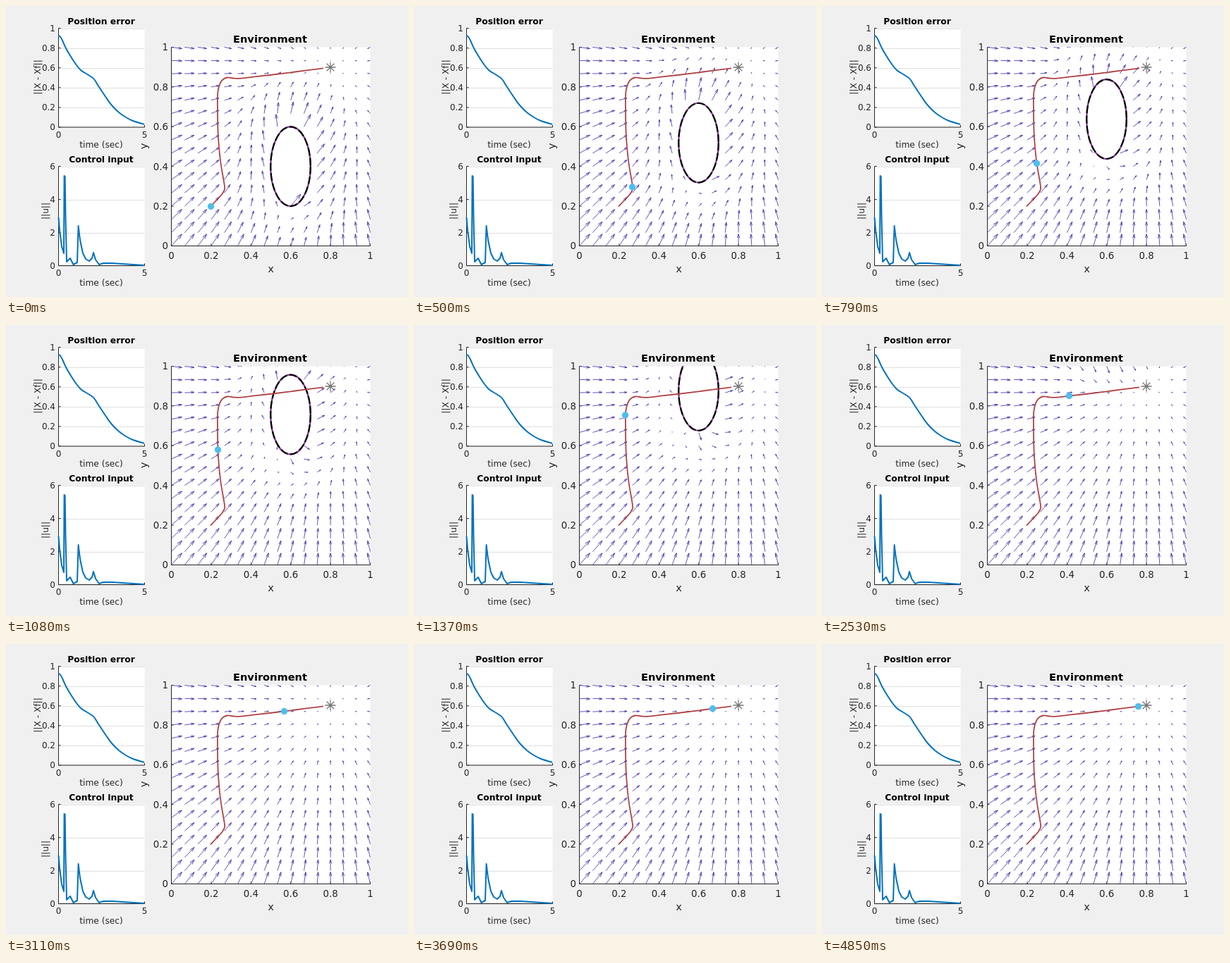
Write an HTML page that moves like this. It is 570 px wide and 413 px high and loops after 5.14 s.

```html
<!DOCTYPE html>
<html lang="en">
<head>
<meta charset="utf-8">
<title>Vector field navigation</title>
<style>
  html, body { margin: 0; width: 100%; height: 100%; overflow: hidden; background: #f0f0f0; }
  svg { display: block; }
  text { font-family: "DejaVu Sans", sans-serif; fill: #262626; }
  .title { font-weight: bold; fill: #000; }
  .grid { stroke: #dfdfdf; }
  .axis { stroke: #262626; fill: none; }
  .curve { stroke: #0072bd; stroke-width: 2; fill: none; stroke-linejoin: round; }
</style>
</head>
<body>
<svg id="stage" width="570" height="413" viewBox="0 0 570 413">
  <clipPath id="field"><rect x="234" y="58" width="283" height="283"/></clipPath>
  <g id="plots"></g>
  <g clip-path="url(#field)" fill="none">
    <path id="arrows" stroke="#3e26a8" stroke-width=".8"/>
    <g id="obstacle" stroke-width="2.2">
      <ellipse cx="403.5" rx="28.3" ry="56.4" stroke="#8a2f9e"/>
      <ellipse cx="403.5" rx="28.3" ry="56.4" stroke="#000" stroke-dasharray="11 3.5"/>
    </g>
  </g>
  <path id="route" fill="none" stroke="#b04346" stroke-width="1.8"/>
  <path d="M452.5 87h15M460 79.5v15M454.7 81.7l10.6 10.6M454.7 92.3l10.6-10.6" stroke="#777" stroke-width="1.3"/>
  <circle id="robot" r="4.7" fill="#4dbeee"/>
</svg>
<script>
const $ = id => document.getElementById(id);
const plots = $('plots');

function add(tag, attrs, content) {
  const el = document.createElementNS('http://www.w3.org/2000/svg', tag);
  for (const name in attrs) el.setAttribute(name, attrs[name]);
  if (content !== undefined) el.textContent = content;
  plots.append(el);
}

function label(content, x, y, size, anchor = 'middle', extra = {}) {
  add('text', { x, y, 'font-size': size, 'text-anchor': anchor, ...extra }, content);
}

function upright(content, x, y, size) {
  label(content, x, y, size, 'middle', { transform: `rotate(-90 ${x} ${y})` });
}

function axes({ x, y, w, h, xTicks, yTicks, size, grid }) {
  add('rect', { x, y, width: w, height: h, fill: '#fff' });
  let ticks = `M${x} ${y}v${h}h${w}`;
  yTicks.forEach((value, i) => {
    const ty = y + h - h * i / (yTicks.length - 1);
    if (grid) add('path', { class: 'grid', d: `M${x} ${Math.round(ty) + .5}h${w}` });
    ticks += `M${x} ${ty}h3`;
    label(value, x - 4.5, ty + size * .37, size, 'end');
  });
  xTicks.forEach((value, i) => {
    const tx = x + w * i / (xTicks.length - 1);
    ticks += `M${tx} ${y + h}v-3`;
    label(value, tx, y + h + size + (grid ? 2.5 : 5.5), size);
  });
  add('path', { class: 'axis', d: ticks });
}

// Catmull-Rom spline through the points
function smooth(p) {
  let d = `M${p[0]}`;
  for (let i = 0; i < p.length - 1; i++) {
    const a = p[i - 1] || p[i], b = p[i], c = p[i + 1], e = p[i + 2] || c;
    d += `C${b[0] + (c[0] - a[0]) / 6} ${b[1] + (c[1] - a[1]) / 6} ` +
         `${c[0] - (e[0] - b[0]) / 6} ${c[1] - (e[1] - b[1]) / 6} ${c}`;
  }
  return d;
}

const unit = ['0', '0.2', '0.4', '0.6', '0.8', '1'];

axes({ x: 74.5, y: 31.5, w: 122, h: 140.5, xTicks: [0, 5], yTicks: unit, size: 12, grid: true });
label('Position error', 135, 26, 12.3, 'middle', { class: 'title' });
label('time (sec)', 135, 201, 12.2);
upright('||X - Xf||', 49, 101, 12.2);
add('path', { class: 'curve', d: smooth([[74.5, 42], [77, 43.5], [80, 49], [85, 60], [92, 72], [100, 84],
  [106, 91], [112, 95], [120, 100], [125, 104], [132, 115], [142, 130], [150, 141], [160, 151],
  [170, 158], [180, 163], [196, 168]]) });

axes({ x: 74.5, y: 227.5, w: 122, h: 141, xTicks: [0, 5], yTicks: [0, 2, 4, 6], size: 12, grid: true });
label('Control input', 135, 222, 12.3, 'middle', { class: 'title' });
label('time (sec)', 135, 397, 12.2);
upright('||u||', 60, 291, 12.2);
add('path', { class: 'curve', d: 'M74.5 300L76 318 79 341 82 351 82.6 241 83.6 242 84.5 300 86 363 88 361 91 358 ' +
  '93 362 95.5 367 101 364 102.6 312 105 332 109 351 113 359 118 362 122 358 124 350 127 360 132 367 ' +
  '138 365 150 365 165 366 180 367 196 368' });

axes({ x: 234.5, y: 58.5, w: 282, h: 282, xTicks: unit, yTicks: unit, size: 13.3 });
label('Environment', 374.5, 52, 14.6, 'middle', { class: 'title' });
label('x', 375.5, 378, 14.6);
upright('y', 200, 199, 14.6);

$('route').setAttribute('d', smooth([[290, 284.5], [299, 275], [307, 266], [310, 260], [309.7, 254], [308, 244],
  [304.5, 223], [302, 200], [300.5, 177], [300, 150], [300, 128], [301, 118], [304, 109], [308, 104],
  [314, 101.5], [322, 102.5], [332, 102.8], [350, 100.7], [374, 98], [410, 93.5], [450, 88.3]]));

const stops = [[290.5, 284.5], [309.5, 257], [304.5, 223.5], [300.5, 177], [299.5, 128], [306.5, 105],
  [314.5, 101], [331, 102.7], [350.5, 100.5], [374.5, 98], [394.5, 95.5], [410.5, 93.5], [423.5, 91.7],
  [432.5, 90.7], [439.5, 89.8], [444.5, 89], [448.5, 88.6]];

const obstacle = { x: .6, rx: .1, ry: .2 };
const reach = .3;

function nearest(x, y, cy) {
  let best = { d: Infinity };
  for (let i = 0; i < 180; i++) {
    const a = i * Math.PI / 90;
    const dx = x - obstacle.x - obstacle.rx * Math.cos(a);
    const dy = y - cy - obstacle.ry * Math.sin(a);
    const d = Math.hypot(dx, dy);
    if (d < best.d) best = { d, nx: dx / (d || 1), ny: dy / (d || 1) };
  }
  return best;
}

// Attraction to the goal plus repulsion that fades out at the reach
function flow(x, y, cy) {
  let u = (.8 - x) * 18.6, v = (.9 - y) * 18.6;
  const { d, nx, ny } = nearest(x, y, cy);
  if (d < reach) {
    const push = 1 - d / reach;
    u += 10.5 * push * nx;
    v += 15.5 * push * ny + 4 * push * Math.abs(nx);
  }
  return [u, v];
}

function quiver(cy) {
  let d = '';
  for (let i = 0; i < 16; i++) for (let j = 0; j < 16; j++) {
    const x = i / 15, y = j / 15;
    if (((x - obstacle.x) / obstacle.rx) ** 2 + ((y - cy) / obstacle.ry) ** 2 < 1) continue;
    const [u, v] = flow(x, y, cy);
    const px = 234.5 + 282 * x, py = 340.5 - 282 * y;
    const tx = px + u, ty = py - v;
    const barb = s => [tx - .33 * (u + s * v), ty + .33 * (v - s * u)].map(n => n.toFixed(2));
    d += `M${px.toFixed(2)} ${py.toFixed(2)}L${tx.toFixed(2)} ${ty.toFixed(2)}` +
         `M${barb(.3)}L${tx.toFixed(2)} ${ty.toFixed(2)}L${barb(-.3)}`;
  }
  return d;
}

const fields = stops.map((_, k) => quiver(.4 + .119 * k));
let shown = -1;

function draw(now) {
  const t = now % 5140;
  const k = t < 500 ? 0 : Math.min(16, 1 + Math.floor((t - 500) / 290));
  if (k !== shown) {
    shown = k;
    $('arrows').setAttribute('d', fields[k]);
    $('obstacle').setAttribute('transform', `translate(0 ${227.7 - 33.56 * k})`);
    $('robot').setAttribute('cx', stops[k][0]);
    $('robot').setAttribute('cy', stops[k][1]);
  }
  requestAnimationFrame(draw);
}
draw(0);
</script>
</body>
</html>
```
